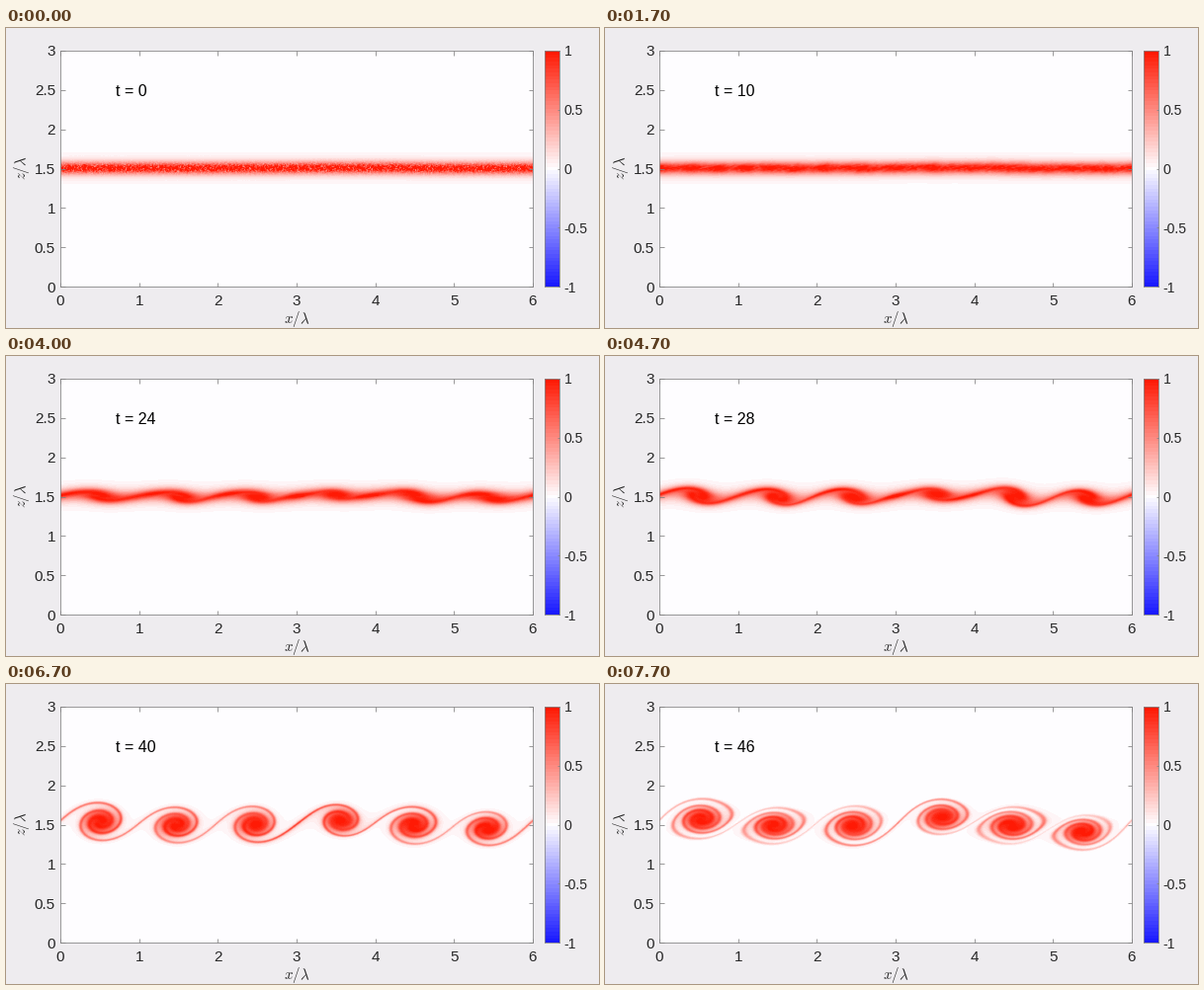
These frames come from a looping animation (600x304 px, 8 s). A matplotlib script:

```python
import numpy as np
import matplotlib.pyplot as plt
from matplotlib.animation import FuncAnimation
from matplotlib.colors import LinearSegmentedColormap

W, H, DPI = 600, 304, 100
PX = 72 / DPI
INK, FRAME = "#262626", "#828282"

plt.rcParams["font.family"] = "Liberation Sans"
plt.rcParams["mathtext.fontset"] = "cm"

# Shear layer: lengths in units of its half thickness, velocities of half the jump.
DELTA = 0.4446 / (2 * np.pi)
NX, NZ, CELL = 600, 100, 0.01
STEP = CELL / DELTA
DT, SUBSTEPS, STATES = 0.5, 4, 24
VISCOSITY = 0.0004
MODES = 80

x = (np.arange(NX) + 0.5) * CELL
z = 1 + (np.arange(NZ) + 0.5) * CELL
COL, ROW = np.meshgrid(np.arange(NX), np.arange(NZ))

# Green's function of the streamfunction for every streamwise wavenumber
wave = 2 * np.pi / 6 * DELTA * np.arange(MODES)
gap = (z[:, None] - z) / DELTA
decay = 0.5 * STEP * np.exp(-wave[:, None, None] * np.abs(gap))
KERNEL_U = (decay * np.sign(gap)).astype(complex)
KERNEL_W = 1j * decay
KERNEL_W[0] = 0


def initial_vorticity():
    # wave count, displacement reached at t = 24, crest, growth rate, response
    waves = [(1, 0.004, 3.0, 0.052, 0.55), (2, 0.010, 0.75, 0.098, 0.6),
             (3, 0.007, 0.0, 0.137, 0.7), (5, 0.003, 1.0, 0.181, 0.9),
             (6, 0.060, 0.25, 0.19, 1.0), (7, 0.003, 0.571, 0.186, 1.0),
             (9, 0.003, 1 / 3, 0.155, 1.0)]
    lift = sum(size * np.exp(-24 * rate) / response
               * np.cos(np.pi / 3 * n * (x - crest))
               for n, size, crest, rate, response in waves)
    layer = np.cosh((z[:, None] - 1.5 - lift) / DELTA) ** -2
    # small-scale noise only, so that it does not disturb the growing waves
    spectrum = np.fft.rfft(np.random.default_rng(4).normal(0, 0.35, (NZ, NX)))
    spectrum[:, :12] = 0
    return layer * (1 + layer * np.fft.irfft(spectrum, NX))


def velocity(vorticity):
    spectrum = np.fft.rfft(vorticity)[:, :MODES].T[:, :, None]
    return [np.fft.irfft((kernel @ spectrum)[:, :, 0].T, NX)
            for kernel in (KERNEL_U, KERNEL_W)]


def weights(s):
    return (-s * (s - 1) * (s - 2) / 6, (s + 1) * (s - 1) * (s - 2) / 2,
            -(s + 1) * s * (s - 2) / 2, (s + 1) * s * (s - 1) / 6)


def sample(fields, col, row):
    """Cubic interpolation, periodic in x."""
    i, j = np.floor(col).astype(int), np.floor(row).astype(int)
    wx, wz = weights(col - i), weights(row - j)
    cols = [(i + n - 1) % NX for n in range(4)]
    rows = [np.clip(j + m - 1, 0, NZ - 1) * NX for m in range(4)]
    result = [np.zeros(col.shape) for _ in fields]
    for m in range(4):
        for n in range(4):
            index, weight = rows[m] + cols[n], wz[m] * wx[n]
            for out, field in zip(result, fields):
                out += weight * field.take(index)
    return result


def simulate():
    vorticity = initial_vorticity()
    states = [vorticity]
    previous = velocity(vorticity)
    shift = DT / STEP
    for count in range(1, (STATES - 1) * SUBSTEPS + 1):
        current = velocity(vorticity)
        u, w = [1.5 * now - 0.5 * old for now, old in zip(current, previous)]
        previous = current
        u, w = sample((u, w), COL - shift / 2 * u, ROW - shift / 2 * w)
        vorticity, = sample((vorticity,), COL - shift * u, ROW - shift * w)
        spread = sum(np.roll(vorticity, s, axis) for axis in (0, 1) for s in (1, -1))
        vorticity = vorticity + VISCOSITY * DT / STEP**2 * (spread - 4 * vorticity)
        if count % SUBSTEPS == 0:
            states.append(vorticity)
    return states


def add_axes(left, top, right, bottom):
    axes = fig.add_axes([left / W, 1 - bottom / H, (right - left) / W, (bottom - top) / H])
    for spine in axes.spines.values():
        spine.set(linewidth=0.8 * PX, color=FRAME)
    return axes


def set_ticks(axis, values):
    axis.set_ticks(values, [f"{v:g}" for v in values])


states = simulate()

fig = plt.figure(figsize=(W / DPI, H / DPI), dpi=DPI, facecolor="#eeecef")
cmap = LinearSegmentedColormap.from_list(
    "vorticity", ["#1a1aff", "#fefdff", "#ff1a05"], N=65)

ax = add_axes(55, 23, 533, 262)
ax.set_facecolor(cmap(0.5))
image = ax.imshow(states[0], cmap=cmap, vmin=-1, vmax=1, origin="lower",
                  extent=(0, 6, 1, 2), aspect="auto", interpolation="bilinear")
ax.set(xlim=(0, 6), ylim=(0, 3))
set_ticks(ax.xaxis, np.arange(7))
set_ticks(ax.yaxis, np.arange(0, 3.1, 0.5))
ax.tick_params(direction="in", top=True, right=True, length=4.5 * PX, width=0.8 * PX,
               color=FRAME, labelcolor=INK, labelsize=15.3 * PX)
ax.tick_params(axis="x", pad=8 * PX)
ax.tick_params(axis="y", pad=5 * PX)

bar = add_axes(545, 23, 560, 262)
bar.imshow(np.linspace(-1, 1, 65)[:, None], cmap=cmap, vmin=-1, vmax=1, origin="lower",
           extent=(0, 1, -1, 1), aspect="auto", interpolation="nearest")
bar.set_xticks([])
bar.yaxis.tick_right()
set_ticks(bar.yaxis, np.arange(-1, 1.1, 0.5))
bar.tick_params(axis="y", direction="in", length=2.5 * PX, width=0.8 * PX, pad=4.7 * PX,
                color=FRAME, labelcolor=INK, labelsize=14 * PX)

fig.text(294 / W, 1 - 295 / H, r"$x/\lambda$", size=15 * PX, color=INK,
         ha="center", va="center")
fig.text(16.5 / W, 1 - 142 / H, r"$z/\lambda$", size=15 * PX, color=INK,
         ha="center", va="center", rotation=90)
clock = fig.text(111.2 / W, 1 - 69 / H, "", size=16 * PX, color="black")


def update(frame):
    state = (3 * frame + 1) // 10
    image.set_data(states[state])
    clock.set_text(f"t = {2 * state}")
    return image, clock


animation = FuncAnimation(fig, update, frames=80, interval=100, repeat=True, repeat_delay=0)
plt.show()
```
